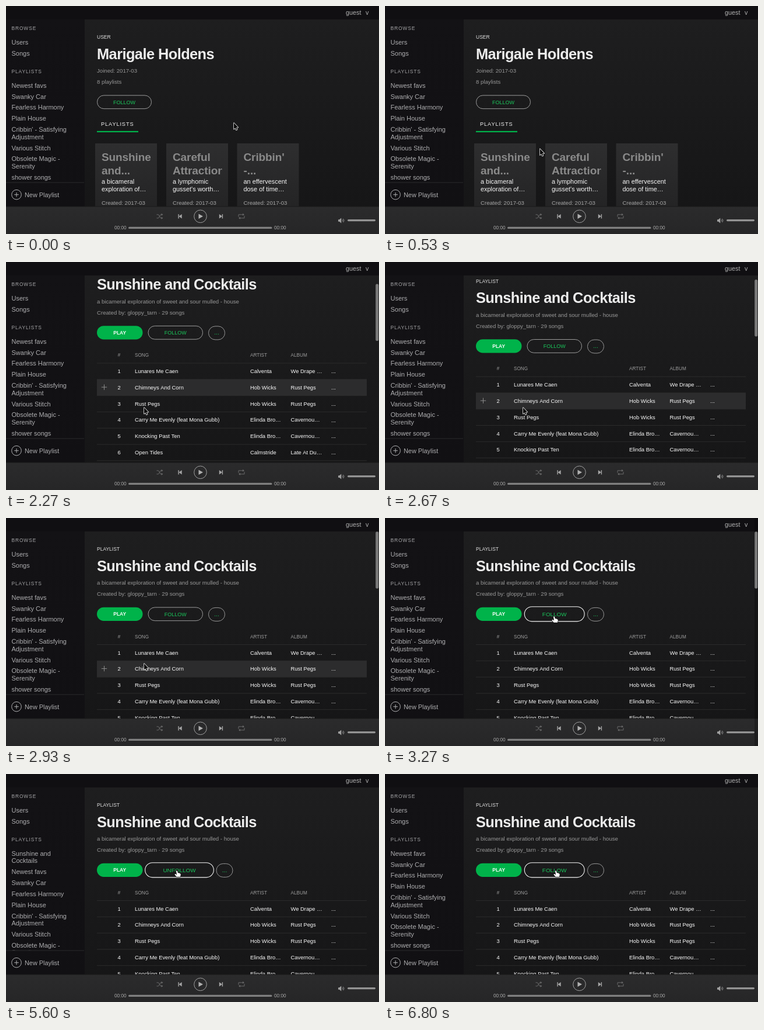
Animation, 640 px wide and 390 px high, one loop 6870 ms. Source, as an HTML page with a canvas:

```html
<!DOCTYPE html>
<html lang="en">
<head>
<meta charset="utf-8">
<title>Playlist follow</title>
<style>
html, body { margin: 0; width: 100%; height: 100%; overflow: hidden; background: #111; }
canvas { display: block; width: 640px; height: 390px; }
</style>
</head>
<body>
<canvas id="stage"></canvas>
<script>
const W = 640, H = 390, LOOP = 6870;
const OPEN = 930, FOLLOW = 4050, UNFOLLOW = 5735;
const GREEN = '#00b34a', LABEL = '#1ac65b';
const FONT = '"Liberation Sans", Arial, sans-serif';
const ROW0 = 216.5, ROW_H = 27.8, BTN_Y = 164.3;

const canvas = document.getElementById('stage');
const dpr = window.devicePixelRatio || 1;
canvas.width = W * dpr;
canvas.height = H * dpr;
const c = canvas.getContext('2d');

const songs = [
  ['Lunares Me Caen', 'Calventa', 'We Drape …'],
  ['Chimneys And Corn', 'Hob Wicks', 'Rust Pegs'],
  ['Rust Pegs', 'Hob Wicks', 'Rust Pegs'],
  ['Carry Me Evenly (feat Mona Gubb)', 'Elinda Bro…', 'Cavernou…'],
  ['Knocking Past Ten', 'Elinda Bro…', 'Cavernou…'],
  ['Open Tides', 'Calmstride', 'Late At Du…']
];
const lists = [
  ['Newest favs'], ['Swanky Car'], ['Fearless Harmony'], ['Plain House'],
  ["Cribbin' - Satisfying", 'Adjustment'], ['Various Stitch'],
  ['Obsolete Magic -', 'Serenity'], ['shower songs']
];
const cards = [
  [153, 'Sunshine', 'and...', 'a bicameral', 'exploration of…'],
  [275, 'Careful', 'Attraction', 'a lymphomic', "gusset's worth…"],
  [396.5, "Cribbin'", '-...', 'an effervescent', 'dose of time…']
];

// Keys are [time, value, ...]
const pointerKeys = [
  [0, 391, 200], [70, 391, 200], [240, 420, 163], [660, 221, 268],
  [1520, 221, 268], [1650, 237, 249], [2940, 237, 249],
  [3230, 290, 168], [3350, 290, 168], [3600, 293, 165]
];
const scrollKeys = [[1660, 0], [2200, 43.5], [2270, 43.5], [2670, 20.4], [2930, 0]];

const clamp = v => Math.max(0, Math.min(1, v));
const ease = v => v * v * (3 - 2 * v);

function track(keys, t) {
  if (t <= keys[0][0]) return keys[0].slice(1);
  for (let i = 1; i < keys.length; i++) {
    const a = keys[i - 1], b = keys[i];
    if (t < b[0]) {
      const p = ease((t - a[0]) / (b[0] - a[0]));
      return a.slice(1).map((v, j) => v + (b[j + 1] - v) * p);
    }
  }
  return keys[keys.length - 1].slice(1);
}

function rect(x, y, w, h, fill) {
  c.fillStyle = fill;
  c.fillRect(x, y, w, h);
}

function pill(x, y, w, h, r, fill, stroke, lw = 1) {
  c.beginPath();
  c.roundRect(x, y, w, h, r);
  if (fill) { c.fillStyle = fill; c.fill(); }
  if (stroke) { c.strokeStyle = stroke; c.lineWidth = lw; c.stroke(); }
}

// y is the middle of the capitals
function text(s, x, y, size, color, { bold = false, gap = 0, align = 'left' } = {}) {
  c.font = (bold ? 'bold ' : '') + size + 'px ' + FONT;
  c.letterSpacing = gap + 'px';
  c.textAlign = align;
  c.fillStyle = color;
  c.fillText(s, x, y - 0.3 + size * 0.36);
}

function line(color, lw, ...pts) {
  c.beginPath();
  pts.forEach((p, i) => i ? c.lineTo(p[0], p[1]) : c.moveTo(p[0], p[1]));
  c.strokeStyle = color;
  c.lineWidth = lw;
  c.stroke();
}

function poly(fill, ...pts) {
  c.beginPath();
  pts.forEach(p => c.lineTo(p[0], p[1]));
  c.closePath();
  c.fillStyle = fill;
  c.fill();
}

function circle(x, y, r, color, lw = 1) {
  c.beginPath();
  c.arc(x, y, r, 0, 7);
  c.strokeStyle = color;
  c.lineWidth = lw;
  c.stroke();
}

function plus(x, y, r, color) {
  line(color, 1, [x - r, y], [x + r, y]);
  line(color, 1, [x, y - r], [x, y + r]);
}

function shade(y0, y1, top, bottom) {
  const g = c.createLinearGradient(0, y0, 0, y1);
  g.addColorStop(0, top);
  g.addColorStop(1, bottom);
  return g;
}

function clipped(x, y, w, h, draw) {
  c.save();
  c.beginPath();
  c.rect(x, y, w, h);
  c.clip();
  draw();
  c.restore();
}

function topBar() {
  rect(0, 0, W, 23, '#100f12');
  text('guest', 583, 11.5, 10.8, '#b0b0b0');
  text('v', 617, 11.5, 10.8, '#b0b0b0');
}

function sidebar(followed) {
  rect(0, 23, 135, 320, shade(23, 343, '#131215', '#111013'));
  const grey = '#aeaeb0', head = '#a4a4a6';
  text('BROWSE', 9.5, 38, 8.4, head, { gap: 0.9 });
  text('Users', 9.5, 62, 11, grey);
  text('Songs', 9.5, 81, 11, grey);
  text('PLAYLISTS', 9.5, 112.5, 8.4, head, { gap: 0.9 });
  const all = followed ? [['Sunshine and', 'Cocktails'], ...lists] : lists;
  clipped(0, 120, 135, 181.5, () => {
    let y = 136;
    for (const item of all) {
      item.forEach((s, i) => text(s, 9.5, y + i * 12.4, 11, grey));
      y += 18.9 + (item.length - 1) * 12.4;
    }
  });
  rect(0, 301.5, 134, 1, '#2b2a2d');
  circle(18, 322.7, 8.3, '#b0b0b2');
  plus(18, 322.7, 3.8, '#b0b0b2');
  text('New Playlist', 32, 323, 10.9, grey);
}

function heading(kind, title, a, b) {
  text(kind, 156, 53.5, 8.5, '#e0e0e0');
  text(title, 156, 82, 25.4, '#ececec', { bold: true, gap: -0.57 });
  text(a, 156, 111, 9.65, '#989898');
  text(b, 156, 130, 9.65, '#989898');
}

function outlineButton(label, x, w, grow) {
  const k = 1 + 0.1 * grow, tone = Math.round(155 + 90 * grow);
  c.save();
  c.translate(x + w / 2, BTN_Y);
  c.scale(k, k);
  pill(-w / 2, -11.4, w, 22.8, 11.4, null, `rgb(${tone},${tone},${tone})`);
  text(label, 0, 0.3, 9, LABEL, { align: 'center' });
  c.restore();
}

function userPage() {
  heading('USER', 'Marigale Holdens', 'Joined: 2017-03', '8 playlists');
  outlineButton('FOLLOW', 156.5, 93, 0);
  text('PLAYLISTS', 163, 202, 9.2, '#f4f4f4', { gap: 0.9 });
  rect(156, 213.8, 71, 2.2, GREEN);
  for (const [x, t1, t2, d1, d2] of cards) {
    rect(x, 235, 106, 108, shade(235, 343, '#2e2e2f', '#242425'));
    clipped(x + 10, 235, 85.5, 108, () => {
      text(t1, x + 11, 258, 19, '#8a8a8a', { bold: true, gap: -0.1 });
      text(t2, x + 11, 281, 19, '#8a8a8a', { bold: true, gap: -0.1 });
      text(d1, x + 11, 300.3, 10.9, '#f6f6f6');
      text(d2, x + 11, 313, 10.9, '#f6f6f6');
      text('Created: 2017-03', x + 11, 336.8, 9.65, '#a6a6a6');
    });
  }
}

function playlistPage(followed, grow, hover) {
  heading('PLAYLIST', 'Sunshine and Cocktails',
    'a bicameral exploration of sweet and sour mulled - house',
    'Created by: gloppy_tarn · 29 songs');
  pill(156, BTN_Y - 11.6, 78.5, 23.2, 11.6, GREEN);
  text('PLAY', 195.2, BTN_Y + 0.3, 8.5, '#f2fdf6', { bold: true, align: 'center' });
  outlineButton(followed ? 'UNFOLLOW' : 'FOLLOW', 244, followed ? 107 : 93.5, grow);
  const dx = followed ? 361 : 347.5;
  pill(dx, 153.4, 28, 23, 11.5, null, '#969696');
  text('...', dx + 14, 164.5, 10, LABEL, { align: 'center' });

  const cols = [[221, 'SONG'], [419, 'ARTIST'], [488.5, 'ALBUM']];
  text('#', 194, 203, 8.2, '#9c9c9c', { align: 'center' });
  cols.forEach(([x, s]) => text(s, x, 203, 8.2, '#9c9c9c'));
  rect(156, ROW0 - 0.5, 463, 1, '#2b2b2b');
  songs.forEach((song, i) => {
    const y = ROW0 + i * ROW_H, mid = y + 14;
    if (i === hover) {
      rect(156, y, 463, ROW_H, '#2c2c2d');
      plus(168.5, mid - 0.7, 4.7, '#8c8c8c');
    }
    rect(156, y + ROW_H - 0.5, 463, 1, '#2b2b2b');
    text(String(i + 1), 194, mid, 9.4, '#fafafa', { align: 'center' });
    cols.forEach(([x], j) => text(song[j], x, mid, 9.4, '#fafafa'));
    text('...', 558, mid, 9.6, '#fafafa');
  });
}

function shuffleIcon(x, y) {
  const col = '#6a6a6a';
  line(col, 1, [x - 5, y - 3], [x - 2, y - 3], [x + 2, y + 3], [x + 4, y + 3]);
  line(col, 1, [x - 5, y + 3], [x - 2, y + 3], [x + 2, y - 3], [x + 4, y - 3]);
  for (const d of [-3, 3]) poly(col, [x + 3, y + d - 2], [x + 6, y + d], [x + 3, y + d + 2]);
}

function repeatIcon(x, y) {
  const col = '#6a6a6a';
  line(col, 1, [x - 5, y + 1], [x - 5, y - 3], [x + 3, y - 3]);
  line(col, 1, [x + 5, y - 1], [x + 5, y + 3], [x - 3, y + 3]);
  poly(col, [x + 2, y - 5], [x + 5, y - 3], [x + 2, y - 1]);
  poly(col, [x - 2, y + 5], [x - 5, y + 3], [x - 2, y + 1]);
}

function skipIcon(x, y, dir) {
  const col = '#a6a6a6';
  poly(col, [x + dir * 2, y], [x - dir * 3.2, y - 3.7], [x - dir * 3.2, y + 3.7]);
  rect(x + dir * 2.4 - 0.7, y - 3.7, 1.4, 7.4, col);
}

function player() {
  rect(0, 343, W, 47, shade(343, 390, '#2b2b2c', '#262627'));
  rect(0, 342.5, W, 1, '#1a1a1b');
  shuffleIcon(263.5, 359.8);
  skipIcon(298.5, 359.8, -1);
  circle(333.5, 359.8, 10.8, '#a0a0a0');
  poly('#b0b0b0', [330.5, 355.6], [338, 359.8], [330.5, 364]);
  skipIcon(369, 359.8, 1);
  repeatIcon(404, 359.8);
  text('00:00', 186, 379.3, 8.2, '#a8a8a8');
  text('00:00', 460, 379.3, 8.2, '#a8a8a8');
  pill(210, 377.7, 246.5, 3.4, 1.7, '#808080');
  poly('#a0a0a0', [570, 365.2], [572, 365.2], [575.3, 362.6], [575.3, 371.4], [572, 368.8], [570, 368.8]);
  for (const r of [2, 4]) {
    c.beginPath();
    c.arc(575.8, 367, r, -0.9, 0.9);
    c.strokeStyle = '#a0a0a0';
    c.lineWidth = 0.9;
    c.stroke();
  }
  pill(586, 365, 48, 3.2, 1.6, '#949494');
}

function statusBar() {
  pill(-1, 378, 213.5, 13, [0, 3, 0, 0], '#dedede');
  text('localhost:3000/#/playlists/3071', 1, 384, 8.5, '#1c1c1c');
}

function outlined(path, fill, stroke, lw) {
  c.lineJoin = 'round';
  c.strokeStyle = stroke;
  c.lineWidth = lw;
  c.stroke(path);
  c.fillStyle = fill;
  c.fill(path);
}

const arrow = new Path2D('M0 0V10.6L2.4 8.4 4 12.1 5.6 11.4 4 7.8H7.3Z');
const hand = new Path2D('M-1 1Q0-.6 1 1L2 4.4Q3.2 3.6 4 4.8Q5.2 4.2 5.6 5.6Q6.8 5.4 6.8 7L6 10.8H-.4L-3.4 7.2Q-3.8 5.6-2 6L.1 7.4Z');

function pointer(x, y, isHand) {
  c.save();
  c.translate(x, y);
  if (isHand) outlined(hand, '#fff', '#111', 1.5);
  else outlined(arrow, '#0a0a0a', '#e8e8e8', 1.6);
  c.restore();
}

function draw(t) {
  const user = t < OPEN;
  const followed = t >= FOLLOW && t < UNFOLLOW;
  const [px, py] = track(pointerKeys, t);
  const [scroll] = track(scrollKeys, t);
  const overCard = user && py > 235 && cards.some(k => px > k[0] && px < k[0] + 106);
  const overButton = !user && t > 2940 && py < 177;
  const grow = ease(clamp((t - 3130) / 120));
  const hover = t < 2940 ? 1 : Math.floor((py - ROW0) / ROW_H);

  c.setTransform(dpr, 0, 0, dpr, 0, 0);
  rect(135, 23, 505, 320, shade(23, 343, '#1e1e1f', '#161617'));
  clipped(135, 23, 505, 320, () => {
    c.translate(0, -scroll);
    if (user) userPage();
    else playlistPage(followed, grow, hover);
  });
  topBar();
  sidebar(followed);
  player();

  const bar = clamp((t - 1660) / 70) * clamp((3900 - t) / 150);
  if (bar > 0) {
    if (t > 2980 && t < 3650) rect(634, 0, 6, H, 'rgba(0,0,0,.25)');
    c.globalAlpha = bar;
    pill(634.2, 23.2 + scroll * 0.33, 5, 97.5, 2.5, '#7a7a7a');
    c.globalAlpha = 1;
  }
  if (overCard && px < 259 || t >= OPEN && t < 1600) statusBar();
  pointer(px, py, overCard || overButton);
}

function tick() {
  draw(performance.now() % LOOP);
  requestAnimationFrame(tick);
}
tick();
</script>
</body>
</html>
```
